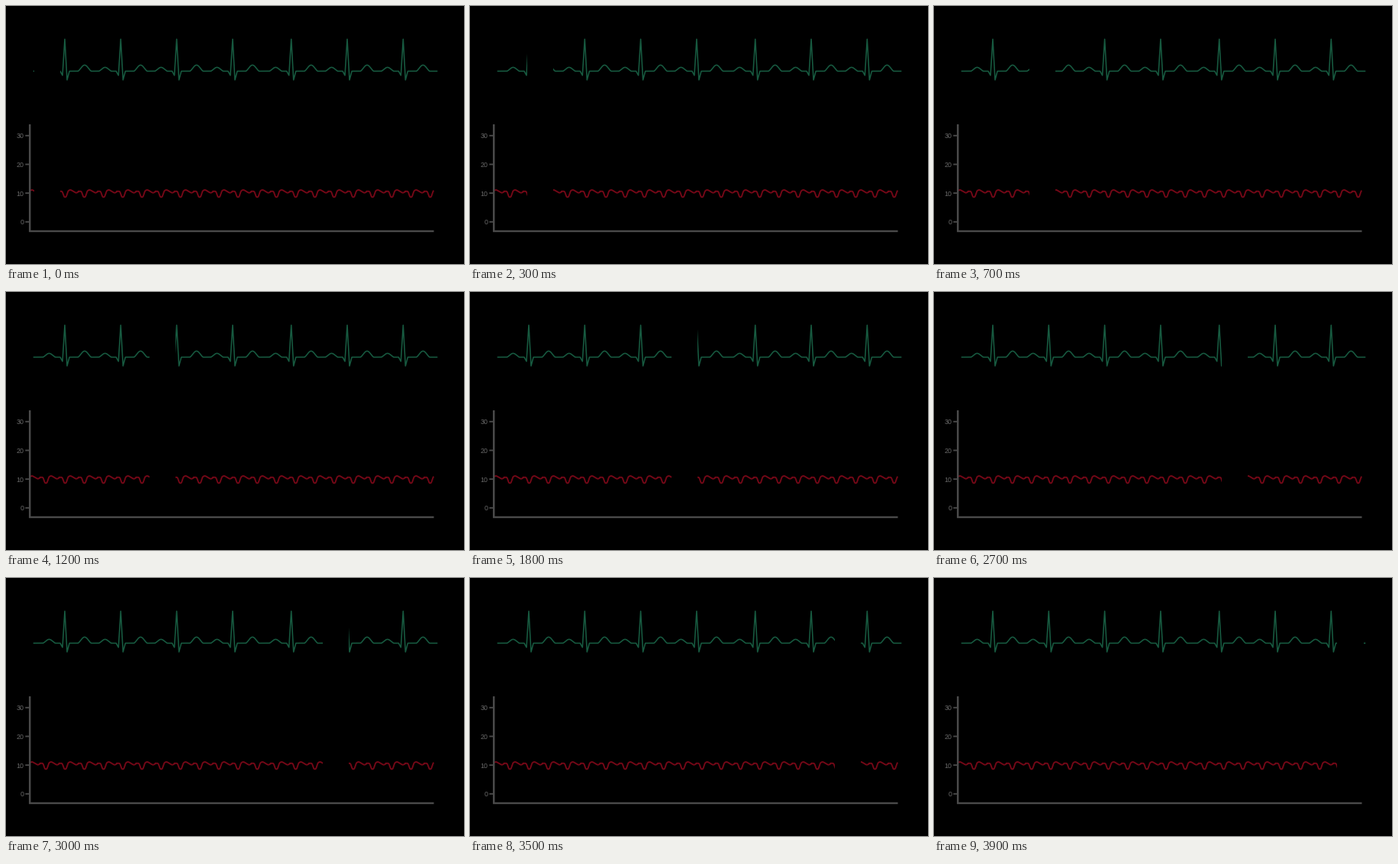
A matplotlib script for the animation above (4 s loop, 600 px wide and 338 px high).

```python
import numpy as np
import matplotlib.pyplot as plt
from matplotlib.animation import FuncAnimation
from matplotlib.patches import Rectangle

W, H, DPI = 600, 338, 100
FRAMES, INTERVAL = 40, 100
PX = 72 / DPI  # points per pixel

GREEN, RED = "#175a40", "#740817"
AXIS, LABEL = "#4a4a4a", "#686868"

HEAD_START, HEAD_STEP, GAP = 36.8, 12.6, 34.4
BASELINE = 85.4

fig = plt.figure(figsize=(W / DPI, H / DPI), dpi=DPI, facecolor="black")
ax = fig.add_axes([0, 0, 1, 1])
ax.set_xlim(0, W)
ax.set_ylim(H, 0)
ax.axis("off")


def stroke(x, y, color, width, **kw):
    ax.plot(x, y, color=color, lw=width * PX, snap=False,
            solid_joinstyle="round", **kw)


def bell(u, center, width, power=2):
    return np.exp(-np.abs((u - center) / width) ** power)


def tent(u, center, width):
    return np.maximum(0, 1 - np.abs(u - center) / width)


def hill(u, center, width):
    return np.cos(np.clip((u - center) / width, -1, 1) * np.pi / 2) ** 1.6


def ecg(x):
    """Each beat: small hill, sharp down-up-down spike, larger hill."""
    y = np.full_like(x, BASELINE)
    beat = np.arange(7)
    late = 3.5 * (beat > 3)  # one slightly longer pause
    for center in 77 + 73.3 * beat + late:
        u = x - center
        y += (5.5 * tent(u, -3, 3) - 42 * tent(u, 0, 3)
              + 11.5 * tent(u, 3, 3)
              - 5 * hill(u, -20.5, 8.5) - 8 * hill(u, 26, 9))
    return y


def pressure(x):
    """Repeating notch, rebound and shallow sag."""
    u = (x - 52.3 + 8) % 25.17 - 8
    return (242.7 + 7.7 * bell(u, 0, 2.9, 3)
            - 1.7 * bell(u, 6.8, 3) + 2 * bell(u, 14.5, 3))


ecg_x = np.arange(36.5, 564.6, 0.1)
stroke(ecg_x, ecg(ecg_x), GREEN, 1.6)
wave_x = np.arange(32, 559.8, 0.25)
stroke(wave_x, pressure(wave_x), RED, 1.9)

# Dark gap that sweeps ahead of the newest sample
gap = Rectangle((HEAD_START, 38), GAP, 222, fc="black", ec="none", zorder=3)
ax.add_patch(gap)

solid = dict(solid_capstyle="butt", zorder=4)
stroke([31.2, 31.2], [155, 296], AXIS, 2.5, **solid)
stroke([30, 560.5], [295, 295], AXIS, 2.4, **solid)
for value in range(0, 40, 10):
    y = 282.8 - 3.767 * value
    stroke([25.3, 31], [y, y], AXIS, 1.9, **solid)
    ax.text(23.7, y + 0.2, str(value), color=LABEL, ha="right",
            va="center_baseline", family="Liberation Sans",
            fontsize=8.9 * PX)


def update(i):
    gap.set_x(HEAD_START + HEAD_STEP * i)
    return (gap,)


anim = FuncAnimation(fig, update, frames=FRAMES, interval=INTERVAL,
                     repeat=True, repeat_delay=0)
plt.show()
```
